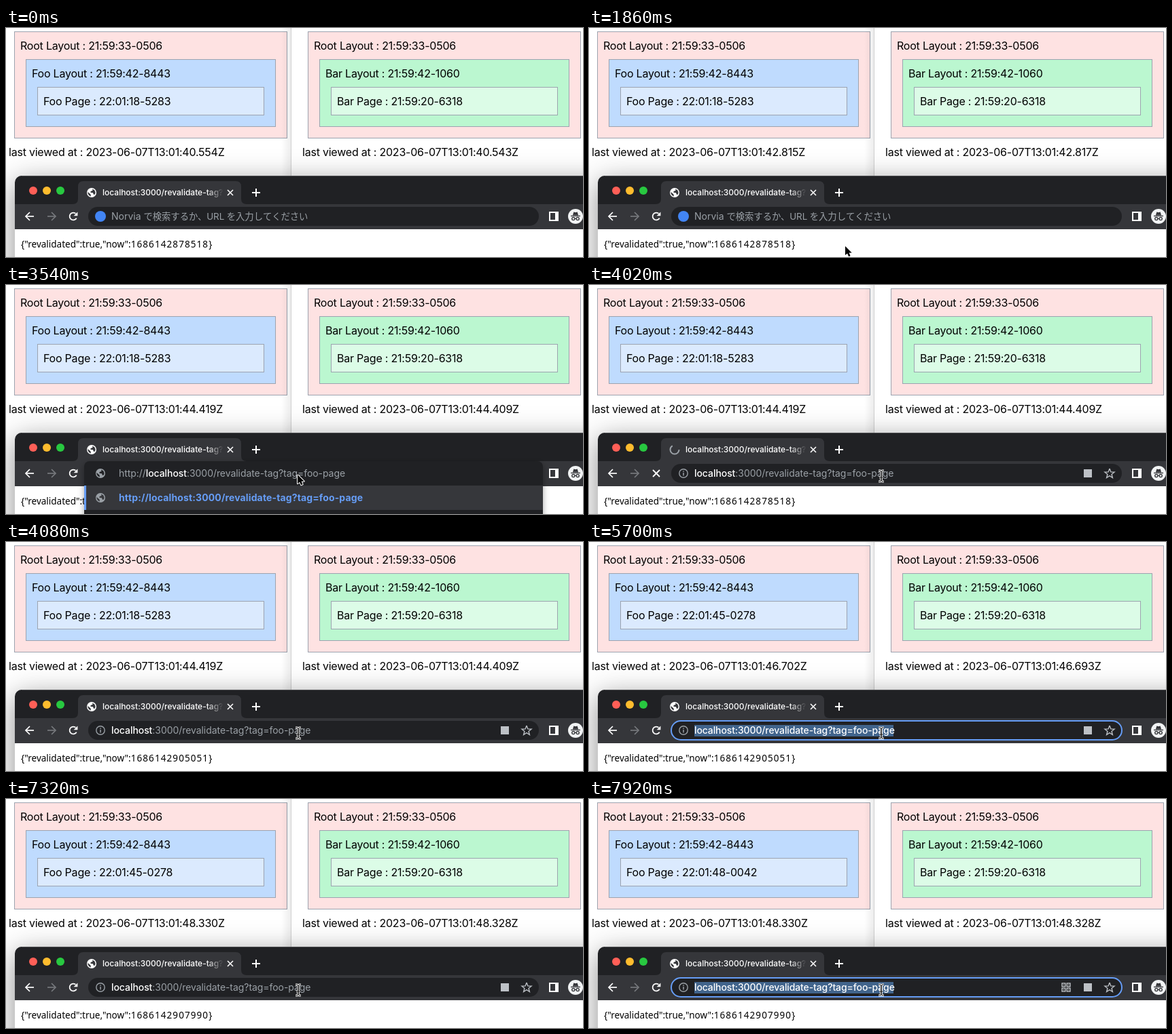
Write an HTML page with a canvas that moves like this. It is 849x338 px and loops after 8000 ms.

```html
<!DOCTYPE html>
<html lang="ja">
<head>
<meta charset="utf-8">
<title>Tag revalidation</title>
<style>
  html, body { margin: 0; width: 100%; height: 100%; overflow: hidden; background: #fff; }
  canvas { display: block; width: 849px; height: 338px; }
</style>
</head>
<body>
<canvas id="stage"></canvas>
<script>
const W = 849, H = 338, LOOP = 8000, STEP = 60;
const canvas = document.getElementById('stage');
const ctx = canvas.getContext('2d');
const dpr = window.devicePixelRatio || 1;
canvas.width = W * dpr;
canvas.height = H * dpr;

const DARK = '#202124', BAR = '#35363a', GREY = '#9aa0a6', WHITE = '#fff', BLUE = '#669df6';
const SANS = 'Inter, "Noto Sans CJK JP", sans-serif';
const HOST = 'localhost', PATH = ':3000/revalidate-tag?tag=foo-page';

// [start, left window, right window]
const VIEWED = [
  [0, '40.554', '40.543'], [300, '41.295', '41.286'], [1080, '42.062', '42.053'],
  [1860, '42.815', '42.817'], [2700, '43.666', '43.665'], [3420, '44.419', '44.409'],
  [4200, '45.181', '45.179'], [4980, '45.951', '45.941'], [5700, '46.702', '46.693'],
  [6540, '47.512', '47.510'], [7320, '48.330', '48.328']
];
const FOO_PAGE = [[0, '22:01:18-5283'], [4200, '22:01:45-0278'], [7380, '22:01:48-0042']];
const NOW = [[0, '1686142878518'], [4080, '1686142905051'], [7020, '1686142907990']];
const BOX_MODE = [
  [0, 'hint'], [2580, 'hintFocus'], [3000, 'empty'], [3060, 'list'],
  [4020, 'url'], [5700, 'selected'], [6960, 'url'], [7920, 'selected']
];

const at = (track, t) => track.filter(k => k[0] <= t).pop();
const within = (t, a, b) => t >= a && t < b;
const ease = p => p * p * (3 - 2 * p);
const clamp = p => Math.max(0, Math.min(1, p));

function text(str, x, y, size, color, { weight = 400, spacing = 0, family = SANS } = {}) {
  ctx.font = `${weight} ${size}px ${family}`;
  ctx.letterSpacing = spacing + 'px';
  ctx.fillStyle = color;
  ctx.fillText(str, x, y);
  return x + ctx.measureText(str).width;
}

function rect(x, y, w, h, color) {
  ctx.fillStyle = color;
  ctx.fillRect(x, y, w, h);
}

function round(x, y, w, h, r, color) {
  ctx.beginPath();
  ctx.roundRect(x, y, w, h, r);
  ctx.fillStyle = color;
  ctx.fill();
}

function shadowed(alpha, blur, dy, paint) {
  ctx.save();
  ctx.shadowColor = `rgba(0,0,0,${alpha})`;
  ctx.shadowBlur = blur * dpr;
  ctx.shadowOffsetY = dy * dpr;
  paint();
  ctx.restore();
}

function disc(x, y, r, color) {
  ctx.beginPath();
  ctx.arc(x, y, r, 0, 7);
  ctx.fillStyle = color;
  ctx.fill();
}

function line(points, color, width = 1.7) {
  ctx.beginPath();
  points.forEach(([x, y]) => ctx.lineTo(x, y));
  ctx.strokeStyle = color;
  ctx.lineWidth = width;
  ctx.stroke();
}

function poly(points, color) {
  ctx.beginPath();
  points.forEach(([x, y]) => ctx.lineTo(x, y));
  ctx.closePath();
  ctx.fillStyle = color;
  ctx.fill();
}

function ring(x, y, r, color, width, from = 0, to = Math.PI * 2) {
  ctx.beginPath();
  ctx.arc(x, y, r, from, to);
  ctx.strokeStyle = color;
  ctx.lineWidth = width;
  ctx.stroke();
}

function frame(x, y, w, h, color) {
  rect(x, y, w, h, color);
  ctx.strokeStyle = '#9ca3af';
  ctx.lineWidth = 1;
  ctx.strokeRect(x + 0.5, y + 0.5, w - 1, h - 1);
}

function page(x, name, layout, pageId, viewed, outer, inner) {
  const put = (s, dx, y) => text(s, x + dx, y, 16, '#000', { spacing: -0.22 });
  frame(x + 12, 5, 402, 158, '#fee2e2');
  frame(x + 29, 46, 368, 100, outer);
  frame(x + 46, 87, 334, 42, inner);
  put('Root Layout : 21:59:33-0506', 21, 32);
  put(`${name} Layout : ${layout}`, 38, 73);
  put(`${name} Page : ${pageId}`, 55, 114);
  put(`last viewed at : 2023-06-07T13:01:${viewed}Z`, 4, 189);
}

function globe(x, y, color, back) {
  disc(x, y, 7, color);
  poly([[x - 5.6, y - 1], [x - 1.5, y + 2.6], [x - 1, y + 5.6], [x - 4, y + 4], [x - 5.6, y + 1]], back);
  poly([[x + 1, y - 5.6], [x + 1.5, y - 3], [x - 1.5, y - 2], [x - 1.5, y], [x + 2, y + 0.2],
    [x + 3, y + 3], [x + 4.8, y + 2.6], [x + 5.6, y], [x + 4.4, y - 3.6]], back);
}

function cross(x, y, r, color, width) {
  line([[x - r, y - r], [x + r, y + r]], color, width);
  line([[x + r, y - r], [x - r, y + r]], color, width);
}

function arrow(x, y, dir, color) {
  line([[x - 6 * dir, y], [x + 6 * dir, y]], color);
  line([[x, y - 6], [x + 6 * dir, y], [x, y + 6]], color);
}

function reload(x, y) {
  ring(x, y, 5.4, WHITE, 1.8, 0.5, 5.4);
  poly([[x + 6.4, y - 6.6], [x + 6.4, y - 0.8], [x + 0.6, y - 0.8]], WHITE);
}

function info(x, y) {
  ring(x, y, 6.2, GREY, 1.4);
  rect(x - 0.75, y - 1, 1.5, 4.4, GREY);
  rect(x - 0.75, y - 3.6, 1.5, 1.5, GREY);
}

function star(x, y) {
  const pts = [];
  for (let i = 0; i <= 10; i++) {
    const a = i * Math.PI / 5 - Math.PI / 2, r = i % 2 ? 3.2 : 7.4;
    pts.push([x + r * Math.cos(a), y + 0.5 + r * Math.sin(a)]);
  }
  line(pts, '#bdc1c6', 1.4);
}

function gridIcon(x, y) {
  ctx.strokeStyle = '#bdc1c6';
  ctx.lineWidth = 1.4;
  for (const dx of [-6, 1.2]) for (const dy of [-6, 1.2]) {
    ctx.strokeRect(x + dx, y + dy, 4.8, 4.8);
    rect(x + dx + 1.7, y + dy + 1.7, 1.4, 1.4, '#bdc1c6');
  }
}

function hatBadge(x, y) {
  disc(x, y, 11, '#f1f3f4');
  poly([[x - 4.2, y - 1.6], [x - 2.6, y - 6.4], [x, y - 5.7], [x + 2.6, y - 6.4], [x + 4.2, y - 1.6]], BAR);
  rect(x - 7, y - 1.2, 14, 1.3, BAR);
  ring(x - 3.2, y + 3.6, 2.1, BAR, 1.3);
  ring(x + 3.2, y + 3.6, 2.1, BAR, 1.3);
  line([[x - 1.1, y + 3.2], [x + 1.1, y + 3.2]], BAR, 1.1);
}

function desktop(t) {
  rect(0, 0, W, H, WHITE);
  const [, left, right] = at(VIEWED, t);
  page(0, 'Foo', '21:59:42-8443', at(FOO_PAGE, t)[1], left, '#bfdbfe', '#dbeafe');
  const shade = ctx.createLinearGradient(405, 0, 419, 0);
  shade.addColorStop(0, 'rgba(0,0,0,0)');
  shade.addColorStop(1, 'rgba(0,0,0,.07)');
  rect(405, 0, 14, H, shade);
  rect(419, 0, 1, H, '#cfcfcf');
  page(432, 'Bar', '21:59:42-1060', '21:59:20-6318', right, '#bbf7d0', '#dcfce7');
}

function tabStrip(loading) {
  ['#ff5f57', '#febc2e', '#28c840'].forEach((c, i) => disc(40 + 20 * i, 240, 6, c));
  ctx.beginPath();
  ctx.moveTo(98, 260);
  ctx.quadraticCurveTo(106, 260, 106, 252);
  ctx.lineTo(106, 234);
  ctx.quadraticCurveTo(106, 226, 114, 226);
  ctx.lineTo(338, 226);
  ctx.quadraticCurveTo(346, 226, 346, 234);
  ctx.lineTo(346, 252);
  ctx.quadraticCurveTo(346, 260, 354, 260);
  ctx.fillStyle = BAR;
  ctx.fill();
  if (loading) ring(126, 243, 6.5, GREY, 2, 0, 4.2);
  else globe(126, 243, WHITE, BAR);
  const fade = ctx.createLinearGradient(296, 0, 320, 0);
  fade.addColorStop(0, '#fff');
  fade.addColorStop(1, 'rgba(255,255,255,0)');
  text(HOST + ':3000/revalidate-tag?', 142, 247, 12, fade, { weight: 500 });
  cross(330, 243, 4, WHITE, 1.6);
  rect(362, 242, 12, 2, WHITE);
  rect(367, 237, 2, 12, WHITE);
}

function url(x, y, prefix = '') {
  const o = { spacing: -0.06 };
  if (prefix) x = text(prefix, x, y, 14, GREY, o);
  x = text(HOST, x, y, 14, WHITE, { weight: 500, spacing: -0.06 });
  return text(PATH, x, y, 14, GREY, o);
}

function suggestions(t) {
  shadowed(0.35, 10, 3, () => round(115, 260, 675, 100, 8, DARK));
  rect(115, 296, 675, 36, '#36373b');
  rect(115, 296, 3, 36, BLUE);
  globe(139, 278, GREY, DARK);
  globe(139, 314, GREY, '#36373b');
  const end = url(166, 283, 'http://');
  if (t < 3540) rect(Math.round(end), 271, 1, 15, WHITE);
  text('http://' + HOST + PATH, 166, 319, 14, BLUE, { weight: 700, spacing: 0.13 });
}

function addressBox(mode, t) {
  if (mode === 'list') return suggestions(t);
  const focused = mode !== 'hint' && mode !== 'url';
  round(121, 264, 663, 28, 14, DARK);
  if (focused) {
    ctx.beginPath();
    ctx.roundRect(121, 264, 663, 28, 14);
    ctx.strokeStyle = BLUE;
    ctx.lineWidth = 2;
    ctx.stroke();
  }
  if (mode === 'url' || mode === 'selected') {
    info(139, 278);
    if (mode === 'selected') {
      rect(155, 270, 293, 17, '#41648c');
      text(HOST + PATH, 155, 283, 14, WHITE, { weight: 500, spacing: -0.12 });
      if (!within(t, 5700, 5880)) gridIcon(702, 278);
    } else {
      url(155, 283);
    }
    rect(728, 272, 12, 12, '#bdc1c6');
    star(766, 278);
    return;
  }
  disc(139, 278, 8, '#4285f4');
  if (mode !== 'empty') {
    const x = text('Norvia ', 155, 283, 14, GREY);
    text('で検索するか、URL を入力してください', x, 283, 13.4, GREY, { spacing: -0.1 });
  }
  if (focused) rect(155, 270, 1, 16, WHITE);
}

function browser(t) {
  const loading = within(t, 4020, 4080) || within(t, 6960, 7020);
  shadowed(0.45, 40, 10, () => round(13, 218, 900, 300, 10, DARK));
  rect(23, 218, W, 1, '#4a4b4e');
  tabStrip(loading);
  rect(13, 260, W, 37, BAR);
  rect(13, 297, W, 41, WHITE);
  const json = { family: '"Noto Sans", sans-serif' };
  const x = text('{"revalidated":true,"now":', 22, 324, 13.5, '#000', json);
  text(at(NOW, t)[1] + '}', x, 324, 13.5, '#000', { ...json, spacing: 1.08 });
  arrow(35, 278, -1, WHITE);
  arrow(67, 278, 1, '#77797d');
  if (loading) cross(99, 278, 5, WHITE, 1.8);
  else reload(99, 278);
  addressBox(at(BOX_MODE, t)[1], t);
  ctx.strokeStyle = WHITE;
  ctx.lineWidth = 2;
  ctx.strokeRect(800, 272, 12, 12);
  rect(808, 272, 4, 12, WHITE);
  hatBadge(838, 278);
}

function pointer(t) {
  if (t < 300) return;
  ctx.lineJoin = 'round';
  if (t >= 4020) {
    for (const [c, w] of [[WHITE, 3], ['#222', 1.2]]) {
      line([[426, 274], [428.5, 274], [430, 276], [430, 288], [428.5, 290], [426, 290]], c, w);
      line([[434, 274], [431.5, 274], [430, 276], [430, 288], [431.5, 290], [434, 290]], c, w);
      line([[427.5, 284], [432.5, 284]], c, w);
    }
  } else {
    const enter = ease(clamp((t - 240) / 420)), go = ease(clamp((t - 1860) / 480));
    const x = 400 - 23 * enter + 52 * go, y = 352 - 30 * enter - 42 * go;
    const shape = [[0, 0], [0, 14], [3.2, 11.2], [5.4, 16], [8, 15], [5.9, 10.2], [10.2, 10.2], [0, 0]]
      .map(([a, b]) => [x + a * 0.95, y + b * 0.95]);
    line(shape, WHITE, 2);
    poly(shape, '#000');
  }
  ctx.lineJoin = 'miter';
}

function draw(now) {
  const t = Math.floor((now % LOOP) / STEP) * STEP;
  ctx.setTransform(dpr, 0, 0, dpr, 0, 0);
  desktop(t);
  browser(t);
  pointer(t);
  requestAnimationFrame(draw);
}
requestAnimationFrame(draw);
</script>
</body>
</html>
```
